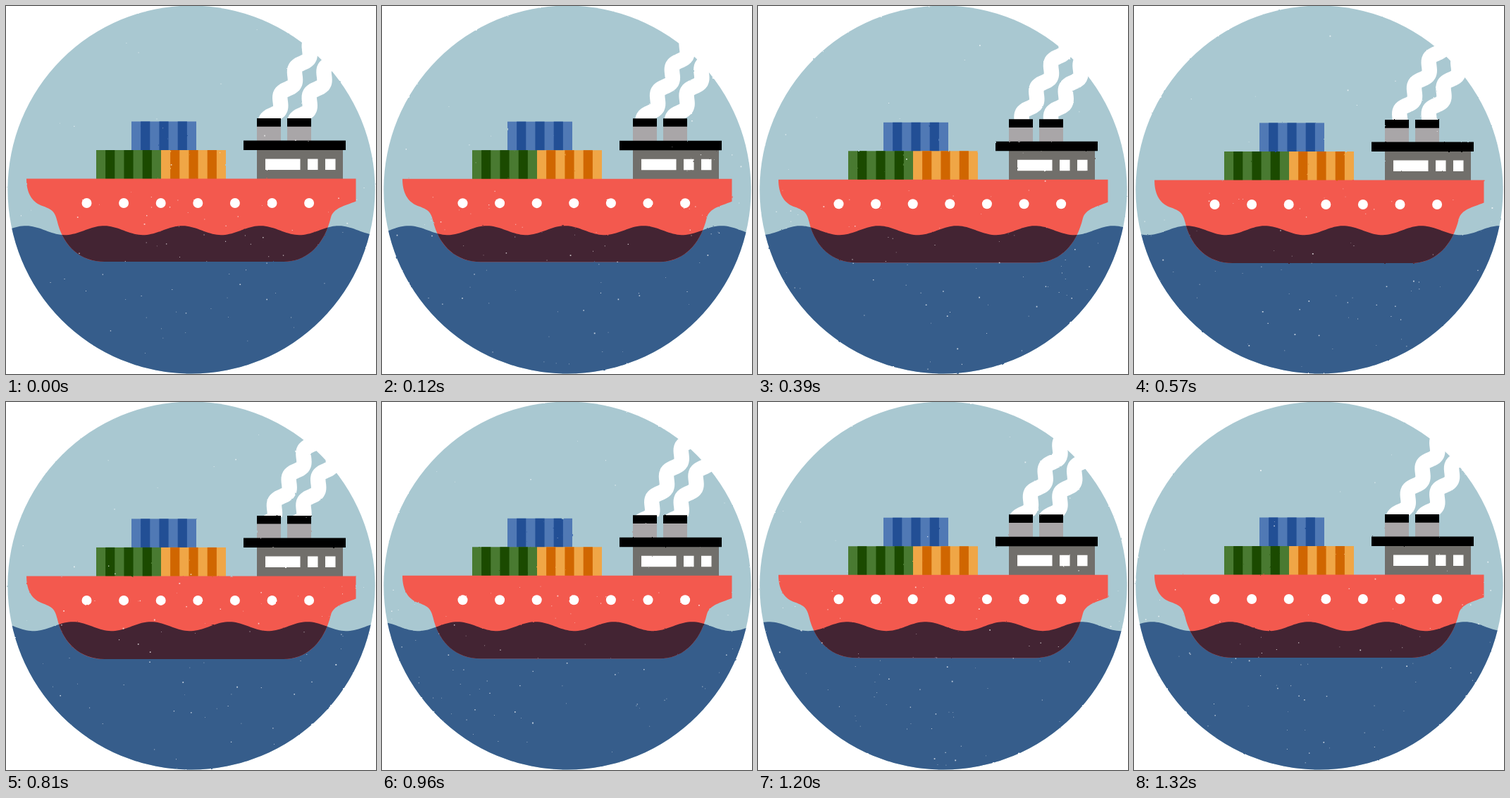
Recreate the animation shown at these times as an HTML page. Size 525 px wide and 521 px high, loop 1.35 s.

```html
<!DOCTYPE html>
<html lang="en">
<head>
<meta charset="utf-8">
<title>Cargo ship</title>
<style>
  html, body { margin: 0; width: 100%; height: 100%; overflow: hidden; background: #fff; }
  svg { display: block; width: 100vw; height: 100vh; }
</style>
</head>
<body>
<svg viewBox="0 0 525 521" xmlns="http://www.w3.org/2000/svg">
  <defs>
    <clipPath id="disc"><circle cx="263" cy="260" r="260.6"/></clipPath>
    <clipPath id="aboveStacks"><rect x="340" y="-20" width="200" height="181"/></clipPath>
    <clipPath id="underwater"><path id="waterClip"/></clipPath>
    <path id="hull" d="M29 244.5H496.500V276.500C480 283 465 286 461 299C452 337 428 362 394 362H140C102 362 80 336 72.500 304C69.500 291 65 288 53 283.500C35 278 29 262 29 244.500Z"/>
    <filter id="rough" filterUnits="userSpaceOnUse" x="0" y="0" width="525" height="521" color-interpolation-filters="sRGB">
      <feTurbulence id="grain" type="fractalNoise" baseFrequency="0.22" numOctaves="1" result="noise"/>
      <feDisplacementMap in="SourceGraphic" in2="noise" scale="2" xChannelSelector="R" yChannelSelector="G"/>
      <feGaussianBlur stdDeviation="0.45"/>
    </filter>
  </defs>
  <g filter="url(#rough)">
    <rect x="-5" y="-5" width="535" height="531" fill="#fff"/>
    <g clip-path="url(#disc)">
      <rect width="525" height="521" fill="#a9c8d1"/>
      <path id="sea" fill="#365d8b"/>
    </g>
    <g class="bob">
      <g clip-path="url(#aboveStacks)" fill="none" stroke="#fff" stroke-width="21.5" stroke-linejoin="round">
        <path class="smoke"/>
        <path class="smoke" transform="translate(41.5)"/>
      </g>
      <g id="cargo"></g>
      <path fill="#a9a6a8" d="M356 170h34v22h-34zM399 170h34v22h-34z"/>
      <path fill="#716f6b" d="M356 203h122v42h-122z"/>
      <path d="M356 159h34v11.700h-34zM399 159h34v11.700h-34zM337 190.500h145v13.500h-145z"/>
      <path fill="#fff" d="M368 216.500h49.500v15.500h-49.500zM428 216.500h14.500v15.500h-14.500zM453 216.500h14.500v15.500h-14.500z"/>
      <use href="#hull" fill="#f3594e"/>
      <g id="portholes" fill="#fff"></g>
    </g>
    <g clip-path="url(#underwater)">
      <g class="bob"><use href="#hull" fill="#432433"/></g>
    </g>
  </g>
  <path id="specks" fill="#fff" fill-opacity=".7"/>
</svg>
<script>
const LOOP = 1350, STEP = 30, TAU = Math.PI * 2;
const $ = id => document.getElementById(id);
const all = sel => [...document.querySelectorAll(sel)];

function add(parent, tag, attrs) {
  const el = document.createElementNS('http://www.w3.org/2000/svg', tag);
  for (const k in attrs) el.setAttribute(k, attrs[k]);
  $(parent).appendChild(el);
}

function container(x, y, height, light, dark) {
  const w = 92 / 7;
  add('cargo', 'rect', { x, y, width: 92, height, fill: light });
  for (let i = 1; i < 7; i += 2) {
    add('cargo', 'rect', { x: x + i * w, y, width: w, height, fill: dark });
  }
}
container(178, 163.5, 41, '#5079b5', '#224f95');
container(128, 204, 41, '#497a31', '#1b4a00');
container(220, 204, 41, '#f0a646', '#d06600');
for (let i = 0; i < 7; i++) add('portholes', 'circle', { cx: 114.5 + i * 52.6, cy: 279, r: 7 });

function polyline(points) {
  return 'M' + points.map(p => p[0].toFixed(2) + ' ' + p[1].toFixed(2)).join('L');
}

function seaPath(phase) {
  const points = [];
  for (let x = -4; x <= 530; x += 3) {
    points.push([x, 317.7 - 6.5 * Math.cos(TAU * ((x - 250) / 111 - phase))]);
  }
  return polyline(points) + 'V530H-4Z';
}

// A sine wave sliding along a slanted axis, one wavelength per loop.
function smokePath(phase) {
  const points = [];
  for (let u = -2; u <= 4.5; u += 0.05) {
    const side = -5 * Math.sin(TAU * u), along = u + phase;
    points.push([368.5 + 20.75 * along + 0.87 * side, 172 - 36.5 * along + 0.5 * side]);
  }
  return polyline(points);
}

function random(seed) {
  let s = seed * 7919 + 17;
  return () => {
    s = (s + 0x6D2B79F5) | 0;
    let t = Math.imul(s ^ (s >>> 15), 1 | s);
    t = (t + Math.imul(t ^ (t >>> 7), 61 | t)) ^ t;
    return ((t ^ (t >>> 14)) >>> 0) / 4294967296;
  };
}

function speckPath(step) {
  const rnd = random(step);
  let d = '';
  for (let i = 0; i < 80; i++) {
    const angle = rnd() * (i % 3 ? Math.PI : TAU), r = 255 * Math.sqrt(rnd());
    const x = 263 + r * Math.cos(angle), y = 260 + r * Math.sin(angle);
    const size = (0.7 + 1.1 * rnd() ** 2).toFixed(1);
    d += `M${x.toFixed(1)} ${y.toFixed(1)}h${size}v${size}h-${size}z`;
  }
  return d;
}

let shown = -1;
function draw(ms) {
  const step = Math.floor((ms % LOOP) / STEP);
  if (step === shown) return;
  shown = step;
  const phase = step * STEP / LOOP;
  const bob = 1.05 * (1 - Math.cos(TAU * phase));
  const water = seaPath(phase), smoke = smokePath(phase);
  $('sea').setAttribute('d', water);
  $('waterClip').setAttribute('d', water);
  all('.smoke').forEach(el => el.setAttribute('d', smoke));
  all('.bob').forEach(el => el.setAttribute('transform', `translate(0 ${bob.toFixed(2)})`));
  $('specks').setAttribute('d', speckPath(step));
  $('grain').setAttribute('seed', step + 1);
}

const start = performance.now();
function tick() {
  draw(performance.now() - start);
  requestAnimationFrame(tick);
}
tick();
</script>
</body>
</html>
```
